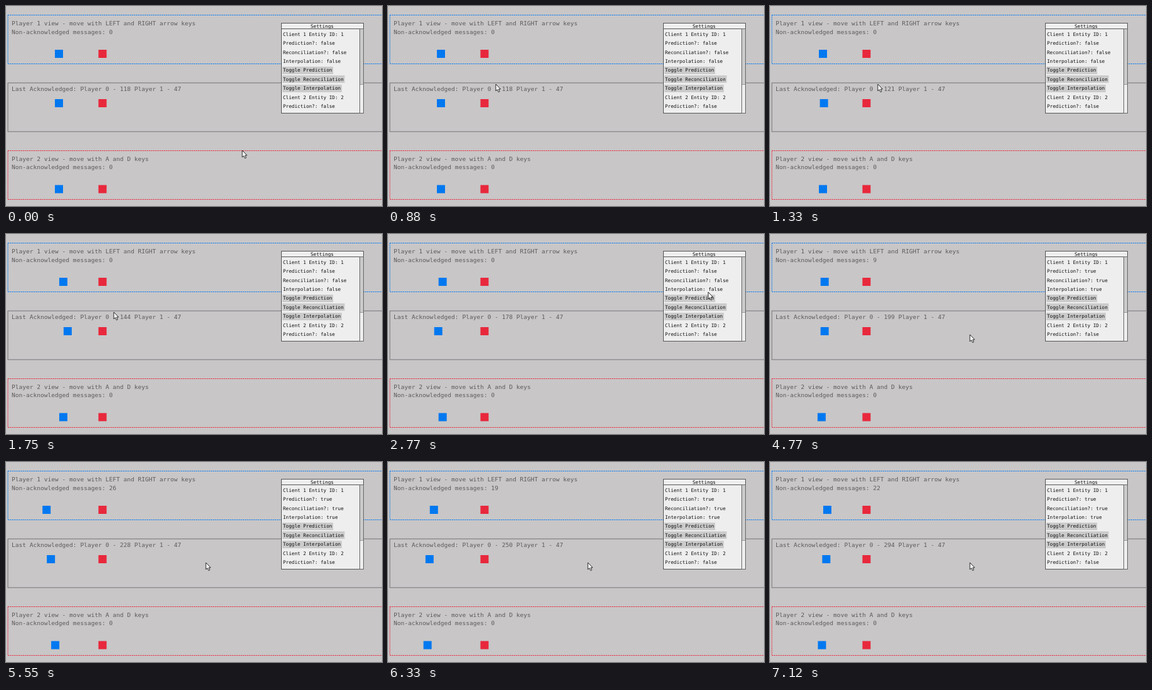
An HTML page with a canvas for the animation above (7.17 s loop, 600 px wide and 320 px high).

```html
<!DOCTYPE html>
<html lang="en">
<head>
<meta charset="utf-8">
<title>Client prediction demo</title>
<style>
html, body { margin: 0; width: 100%; height: 100%; overflow: hidden; background: #c8c6c7; }
canvas { display: block; }
</style>
</head>
<body>
<canvas id="stage" width="600" height="320"></canvas>
<script>
const ctx = document.getElementById("stage").getContext("2d");
const LOOP = 7170;
const RATE = 0.055;  // input messages per ms
const MOVE = 0.535;  // pixels per message
const LAG = 236;     // one-way network delay, ms
const BLUE = "#0078f0", RED = "#e8283c", GREY = "#757375", PALE = "#cbcbcb";
const MONO = '"DejaVu Sans Mono", "Liberation Mono", monospace';
const CHAR = 4.62;   // advance of the settings text

// Key presses: start time and message count, negative for left
const presses = [[1035, 26], [1910, -38], [4150, 17], [4780, -45], [5970, 56], [6988, -3]];

// Pointer moves: start, end, target x, target y
const glides = [[90, 700, 172, 125], [2260, 2740, 511, 93], [2800, 3460, 512, 130], [3520, 3850, 319, 161]];

const features = ["Prediction", "Reconciliation", "Interpolation"];
const clickTime = i => 2900 + i * 280;
const clamp = (v, lo, hi) => Math.max(lo, Math.min(hi, v));

function playerAt(t) {
  let x = 78, sent = 118;
  for (const [start, count] of presses) {
    const n = Math.floor(clamp((t - start) * RATE, 0, Math.abs(count)));
    x += Math.sign(count) * n * MOVE;
    sent += n;
  }
  return { x, sent };
}

function pointerAt(t) {
  let x = 377, y = 231;
  for (const [start, end, toX, toY] of glides) {
    const u = clamp((t - start) / (end - start), 0, 1), e = u * u * (3 - 2 * u);
    x += (toX - x) * e;
    y += (toY - y) * e;
  }
  return [x, y];
}

function box(x, y, w, h, color) {
  ctx.fillStyle = color;
  ctx.fillRect(x, y, w, h);
}

function frame(x, y, w, h, color, dash = []) {
  ctx.strokeStyle = color;
  ctx.lineWidth = 1;
  ctx.setLineDash(dash);
  ctx.strokeRect(x + 0.5, y + 0.5, w, h);
  ctx.setLineDash([]);
}

function label(str, x, y, size, color) {
  ctx.font = size + "px " + MONO;
  ctx.fillStyle = color;
  ctx.fillText(str, x, y);
}

function view(y, color, dash, lines, blueX, squareY) {
  frame(2.5, y, 640, 78, color, dash);
  lines.forEach((s, i) => label(s, 9, squareY - 38.8 + (i + 2 - lines.length) * 13.3 + (lines.length < 2 ? 12.4 : 0), 9.57, "#5c5a5c"));
  box(blueX, squareY, 13, 13, BLUE);
  box(147.5, squareY, 13, 13, RED);
}

function settings(t) {
  box(439, 27, 132, 145, "#eeeeee");
  box(564, 37, 6, 88, PALE);
  frame(439, 27, 131, 144, "#555");
  frame(439, 27, 131, 9, "#555");
  frame(564, 36, 6, 135, "#666");
  box(565, 125, 5, 1, "#999");
  label("Settings", 486, 34.6, 7.67, "#111");

  const status = features.map((name, i) =>
    name + (i < 2 ? "?: " : ": ") + (t >= clickTime(i)));
  const rows = ["Client 1 Entity ID: 1", ...status,
    ...features.map(name => "Toggle " + name),
    "Client 2 Entity ID: 2", "Prediction?: false"];
  rows.forEach((str, i) => {
    const y = 44.8 + i * 14.45;
    if (str.startsWith("Toggle")) box(441, Math.round(y - 6), str.length * CHAR + 2.5, 12, PALE);
    label(str, 442, y + 2.8, 7.67, "#111");
  });
}

function arrow([x, y]) {
  const points = [[0, 0], [0, 11], [2.5, 8.7], [4.3, 12.7], [6.2, 11.8], [4.5, 8], [7.6, 8]];
  ctx.beginPath();
  points.forEach(([dx, dy]) => ctx.lineTo(x + dx, y + dy));
  ctx.closePath();
  ctx.fillStyle = "#fff";
  ctx.fill();
  ctx.strokeStyle = "#222";
  ctx.lineWidth = 1;
  ctx.stroke();
}

function draw(t) {
  const local = playerAt(t), server = playerAt(t - LAG), remote = playerAt(t - 2 * LAG);
  const predicted = t >= clickTime(2);
  const pending = predicted ? local.sent - remote.sent : 0;

  box(0, 0, 600, 320, "#c8c6c7");
  view(14, BLUE, [2, 1],
    ["Player 1 view - move with LEFT and RIGHT arrow keys", "Non-acknowledged messages: " + pending],
    predicted ? local.x : remote.x, 70);
  view(122.5, GREY, [],
    ["Last Acknowledged: Player 0 - " + server.sent + " Player 1 - 47"],
    server.x, 149);
  view(231, RED, [2, 1],
    ["Player 2 view - move with A and D keys", "Non-acknowledged messages: 0"],
    remote.x, 286.5);
  settings(t);
  arrow(pointerAt(t));
}

const begin = performance.now();
function tick() {
  draw((performance.now() - begin) % LOOP);
  requestAnimationFrame(tick);
}
tick();
</script>
</body>
</html>
```
